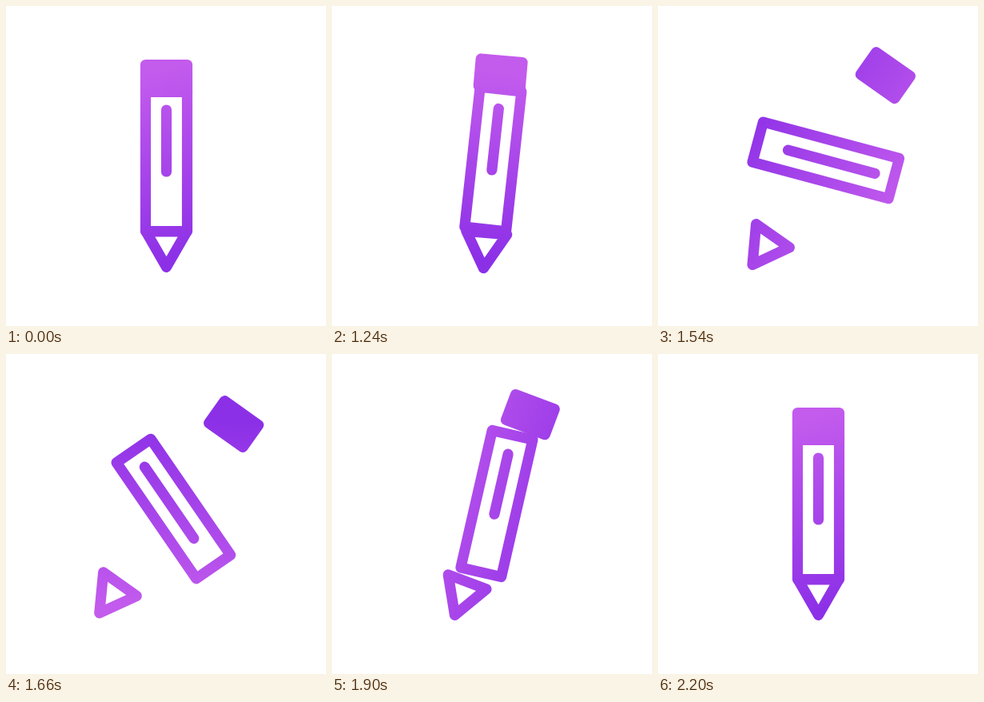
An HTML page that plays this animation: 400 px wide and 400 px high, repeating every 2.35 s.

```html
<!DOCTYPE html>
<html lang="en">
<head>
<meta charset="utf-8">
<title>Pencil</title>
<style>
  html, body { margin: 0; width: 100%; height: 100%; overflow: hidden; background: #fff; }
  svg { display: block; width: 100vw; height: 100vh; }
</style>
</head>
<body>
<svg viewBox="0 0 400 400">
  <defs>
    <linearGradient id="ink" gradientUnits="userSpaceOnUse" x1="200" y1="82" x2="200" y2="318">
      <stop offset="0" stop-color="#c35bed"/>
      <stop offset="1" stop-color="#8c30e7"/>
    </linearGradient>
    <mask id="pencil" maskUnits="userSpaceOnUse" x="0" y="0" width="400" height="400">
      <g id="whole" fill="none" stroke="#fff" stroke-width="13.2" stroke-linecap="round" stroke-linejoin="round">
        <path id="eraser" fill="#fff" d="M174.5 73.5h52v34h-52z"/>
        <g id="body">
          <path d="M174.5 105.5h52v176h-52z"/>
          <line id="slot" x1="200.5" x2="200.5"/>
        </g>
        <path id="tip" d="M175 282h51L200.5 326.3z"/>
      </g>
    </mask>
  </defs>
  <rect width="400" height="400" fill="url(#ink)" mask="url(#pencil)"/>
</svg>
<script>
const LOOP = 2350, FIRST = 1030, LAST = 2200, STEP = 30;
const MID = 193.5;
const $ = id => document.getElementById(id);
const [ink, whole, eraser, body, slot, tip] =
  ['ink', 'whole', 'eraser', 'body', 'slot', 'tip'].map($);

// Smooth 0..1 ramp between two times
function ramp(t, from, to) {
  const u = Math.min(1, Math.max(0, (t - from) / (to - from)));
  return u * u * (3 - 2 * u);
}

const mix = (a, b, p) => a + (b - a) * p;

function bezier(u, x1, y1, x2, y2) {
  if (u <= 0) return 0;
  if (u >= 1) return 1;
  const at = (s, a, b) => 3 * a * s * (1 - s) ** 2 + 3 * b * s * s * (1 - s) + s ** 3;
  let lo = 0, hi = 1;
  for (let i = 0; i < 24; i++) {
    const s = (lo + hi) / 2;
    if (at(s, x1, x2) < u) lo = s; else hi = s;
  }
  return at(lo, y1, y2);
}

// Drift of all parts along the pencil axis: [time, pixels]
const LIFT = [[1030, 0], [1100, 0], [1240, 2], [1390, 6], [1660, 4.2], [1900, 7.7], [2070, 0]];

function track(keys, t) {
  let v = keys[0][1];
  for (let i = 1; i < keys.length; i++) {
    v += (keys[i][1] - keys[i - 1][1]) * ramp(t, keys[i - 1][0], keys[i][0]);
  }
  return v;
}

function draw(t) {
  const rise = bezier((t - 1000) / 600, 0.7, -0.2, 0.3, 1);
  const tilt = 35.4 * rise * (1 - ramp(t, 1660, 2200));
  const gap = 27 * rise * (1 - ramp(t, 1760, 2080));
  const turn = 180 * ramp(t, 1200, 2000);
  const side = 3.6 * Math.sin(turn * Math.PI / 180);
  const hue = -15 + 360 * ramp(t, 1080, 2170);
  const move = (el, y) => el.setAttribute('transform', `translate(0 ${y})`);

  whole.setAttribute('transform', `rotate(${tilt} 200 200) translate(${side} ${-track(LIFT, t)})`);
  move(eraser, -gap);
  move(tip, gap);
  body.setAttribute('transform', `rotate(${turn} 200.5 ${MID})`);

  // The slot stretches down first, then its upper end follows
  slot.setAttribute('y1', MID + mix(-63.5, -13.5, ramp(t, 1540, 1830)));
  slot.setAttribute('y2', MID + mix(13.5, 63.5, ramp(t, 1360, 1640)));
  ink.setAttribute('gradientTransform', `rotate(${hue} 200 200)`);
}

const start = performance.now();

function frame() {
  const t = (performance.now() - start) % LOOP;
  const held = FIRST + Math.floor((t - FIRST) / STEP) * STEP;
  draw(t < FIRST ? 0 : Math.min(held, LAST));
  requestAnimationFrame(frame);
}

frame();
</script>
</body>
</html>
```
